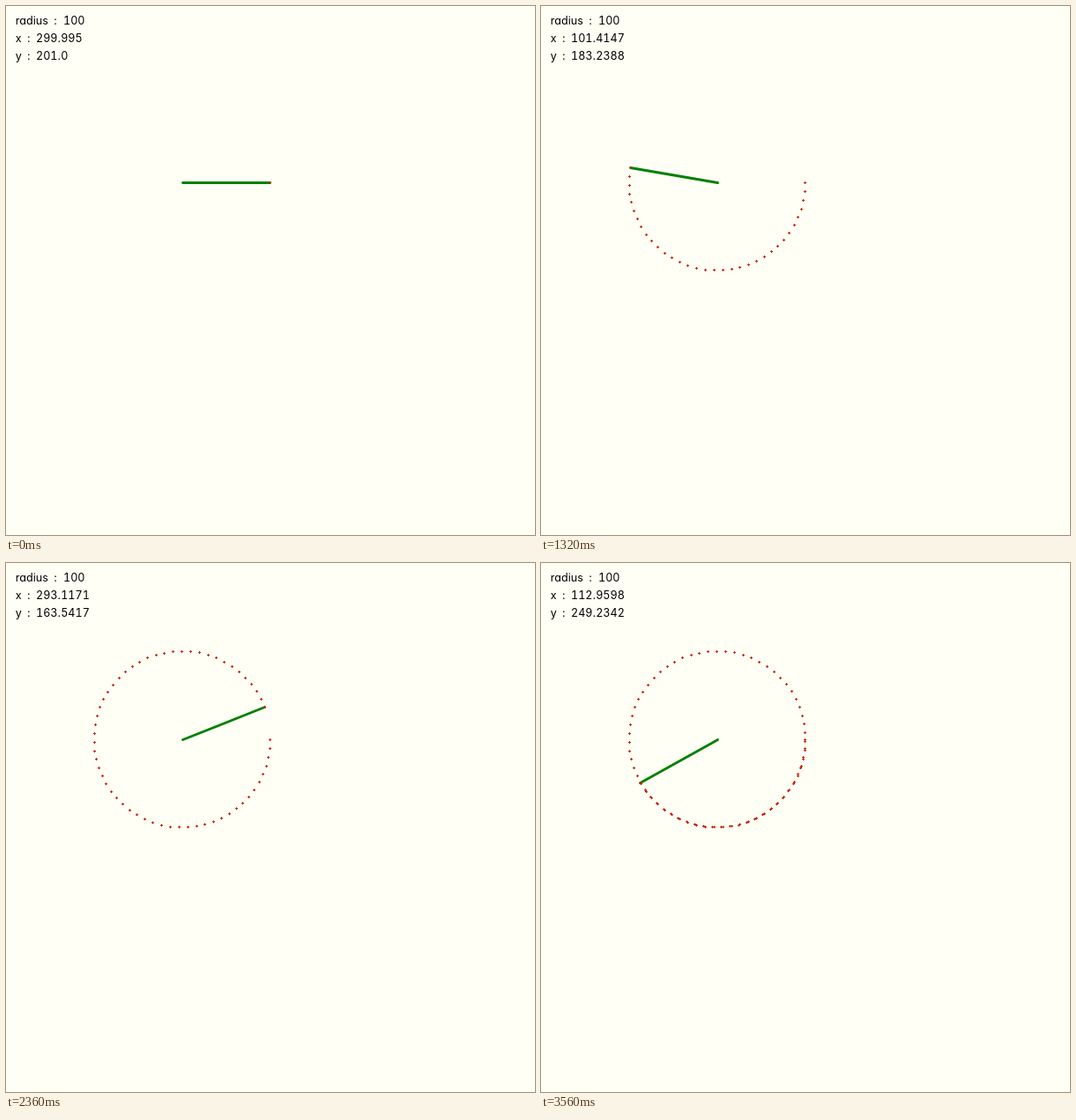
Write an HTML page that moves like this. It is 600 px wide and 600 px high and loops after 3600 ms.

```html
<!DOCTYPE html>
<html lang="en">
<head>
<meta charset="utf-8">
<title>Circle from polar coordinates</title>
<style>
  html, body { margin: 0; width: 100%; height: 100%; overflow: hidden; background: #fffff5; }
  svg { display: block; }
  text { font: 400 12.6px Inter, sans-serif; font-feature-settings: "cv11"; word-spacing: 2.8px; }
  .digits { font-feature-settings: "tnum"; }
</style>
</head>
<body>
<svg width="600" height="600">
  <line id="arm" x1="200.5" y1="200.5" stroke="#008000" stroke-width="2.8" stroke-linecap="round"/>
  <path id="trail" fill="#cc2200" shape-rendering="crispEdges"/>
  <text x="10.7" y="21">radius :<tspan x="65" class="digits">100</tspan></text>
  <text x="10.7" y="41">x :<tspan x="34" id="xValue"></tspan></text>
  <text x="10.7" y="61">y :<tspan x="34" id="yValue"></tspan></text>
</svg>
<script>
const CENTER = 200, RADIUS = 100, STEP_MS = 40, STEPS = 90;
const byId = id => document.getElementById(id);
const arm = byId('arm'), trail = byId('trail');

function pointAt(step) {
  const angle = 0.01 + step * 0.1;
  return [CENTER + RADIUS * Math.cos(angle), CENTER + RADIUS * Math.sin(angle)];
}

// A plus of five pixels
function dot(step) {
  const [x, y] = pointAt(step).map(Math.floor);
  return `M${x - 1},${y}h3v1h-3zM${x},${y - 1}h1v3h-1z`;
}

// Up to four decimals, at least one; only the digits are tabular
function showValue(id, value) {
  const rounded = +value.toFixed(4);
  const label = Number.isInteger(rounded) ? rounded.toFixed(1) : String(rounded);
  byId(id).innerHTML = label.replace(/\d+/g, '<tspan class="digits">$&</tspan>');
}

function draw(step) {
  const [x, y] = pointAt(step);
  arm.setAttribute('x2', Math.floor(x) + 0.5);
  arm.setAttribute('y2', Math.floor(y) + 0.5);
  trail.setAttribute('d', Array.from({ length: step + 1 }, (_, i) => dot(i)).join(''));
  showValue('xValue', x);
  showValue('yValue', y);
}

let start, shown;
function tick(now) {
  start ??= now;
  const step = Math.floor((now - start) / STEP_MS) % STEPS;
  if (step !== shown) draw(shown = step);
  requestAnimationFrame(tick);
}
draw(0);
requestAnimationFrame(tick);
</script>
</body>
</html>
```
